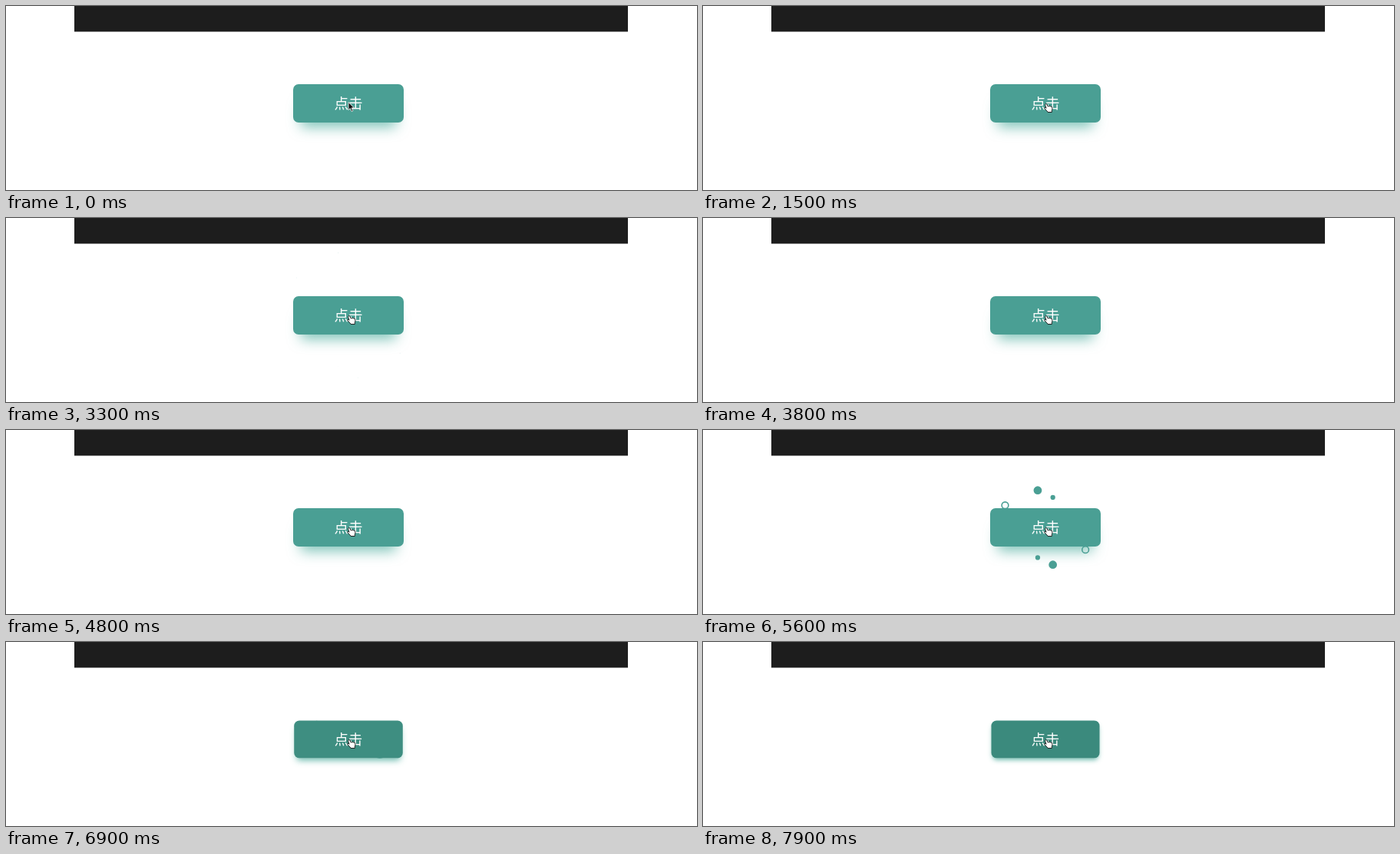
An HTML page for the animation above (8000 ms loop, 900x240 px).

```html
<!DOCTYPE html>
<html lang="zh">
<head>
<meta charset="utf-8">
<title>Button</title>
<style>
  html, body { margin: 0; width: 100%; height: 100%; overflow: hidden; background: #fff; }
  #stage { position: relative; width: 900px; height: 240px; overflow: hidden; }
  #stage > * { position: absolute; }
  svg { left: 0; top: 0; }
  #shadow, #button { left: 374px; top: 102px; width: 144px; height: 50px; border-radius: 7px; }
  #button {
    color: #fff; text-align: center;
    font: 500 18.6px/48.6px "Noto Sans CJK SC", "Noto Sans CJK", "Noto Sans CJK JP", sans-serif;
  }
</style>
</head>
<body>
<div id="stage">
  <svg width="900" height="240"><path fill="#1d1d1d" d="M89 0h721v33.6h-721z"/></svg>
  <div id="shadow"></div>
  <svg id="bubbles" width="900" height="240"><g transform="translate(445.8 127.2)"></g></svg>
  <div id="button">点击</div>
  <svg width="900" height="240">
    <path id="arrow" fill="#111" stroke="#fff" stroke-width=".8"
      d="M446 125.5v10.2l2.4-2.2 1.7 4 1.8-.8-1.7-3.8h3.2z"/>
    <path id="hand" fill="#fff" stroke="#111" stroke-width=".9" stroke-linejoin="round"
      d="M447 133.3l-1.2-3.6q-.5-1.6.8-2 1.1-.3 1.6 1l.9 2.3q.8-.8 1.8-.2.9-.6 1.8.1 1.6-.3 2 1.2.6 2.6-.4 4.2v2.2h-5.2l-1-1.6-3-2.8q-.8-1 .2-1.6.8-.3 1.7.4z"/>
  </svg>
</div>
<script>
const LOOP = 8000;
const TEAL = [74, 159, 148], DARK = [59, 138, 125];
const HAND_AT = 1000;
const PRESSES = [[2180, 2610], [4780, 5200], [6420, 6840], [7150, LOOP]];
const PRESS_MS = 500, RELEASE_MS = 300;

// Offsets from the button centre; every bubble has a mirrored twin.
const BUBBLES = [
  { from: [-6, -6], to: [-13, -83], r: 12, life: 750 },
  { from: [6, -5], to: [13, -67], r: 7, life: 750 },
  { from: [-33, -3], to: [-68, -50], r: 11.5, life: 750, ring: true },
  { from: [-22, -8], to: [-112, -20], r: 10, life: 290, ring: true },
  { from: [-40, -10], to: [-50, -60], r: 10, life: 290 }
];

const $ = id => document.getElementById(id);
const clamp = v => Math.min(1, Math.max(0, v));
const ease = v => { v = clamp(v); return v * v * (3 - 2 * v); };
const mix = (a, b, p) => a + (b - a) * p;

const group = document.querySelector("#bubbles g");
const dots = BUBBLES.flatMap(b => [1, -1].map(side => {
  const el = document.createElementNS("http://www.w3.org/2000/svg", "circle");
  const color = `rgb(${TEAL})`;
  el.setAttribute("fill", b.ring ? "none" : color);
  if (b.ring) el.setAttribute("stroke", color);
  group.append(el);
  return { ...b, side, el };
}));

function pressAmount(t) {
  let amount = 0;
  for (const [down, up] of PRESSES) {
    if (t < down) break;
    const held = ease((Math.min(t, up) - down) / PRESS_MS);
    amount = t < up ? held : held * (1 - ease((t - up) / RELEASE_MS));
  }
  return amount;
}

// Time since the last release, or -1 while held or before any press.
function burstAge(t) {
  const last = PRESSES.filter(([down]) => down <= t).pop();
  return last && t >= last[1] ? t - last[1] : -1;
}

function drawBubble({ from, to, r, life, ring, side, el }, age) {
  const alive = age >= 0 && age < life;
  el.style.display = alive ? "" : "none";
  if (!alive) return;
  const p = ease(age / life);
  const radius = r * (1 - p);
  const line = ring ? Math.min(1.6, radius) : 0;
  el.setAttribute("cx", side * mix(from[0], to[0], p));
  el.setAttribute("cy", side * mix(from[1], to[1], p));
  el.setAttribute("r", Math.max(0, radius - line / 2));
  el.setAttribute("stroke-width", line);
}

function draw(t) {
  const p = pressAmount(t);
  const scale = p ? `scale(${mix(1, 0.98, p)})` : "none";
  $("button").style.transform = $("shadow").style.transform = scale;
  $("button").style.background = `rgb(${TEAL.map((c, i) => mix(c, DARK[i], p))})`;
  $("shadow").style.boxShadow =
    `0 ${mix(16, 4, p)}px ${mix(17, 7, p)}px ${mix(-10, -2, p)}px rgba(60,165,148,${mix(0.65, 0.8, p)})`;
  $("arrow").style.display = t < HAND_AT ? "" : "none";
  $("hand").style.display = t < HAND_AT ? "none" : "";
  const age = burstAge(t);
  dots.forEach(d => drawBubble(d, age));
}

const start = performance.now();
function tick() {
  draw((performance.now() - start) % LOOP);
  requestAnimationFrame(tick);
}
tick();
</script>
</body>
</html>
```
